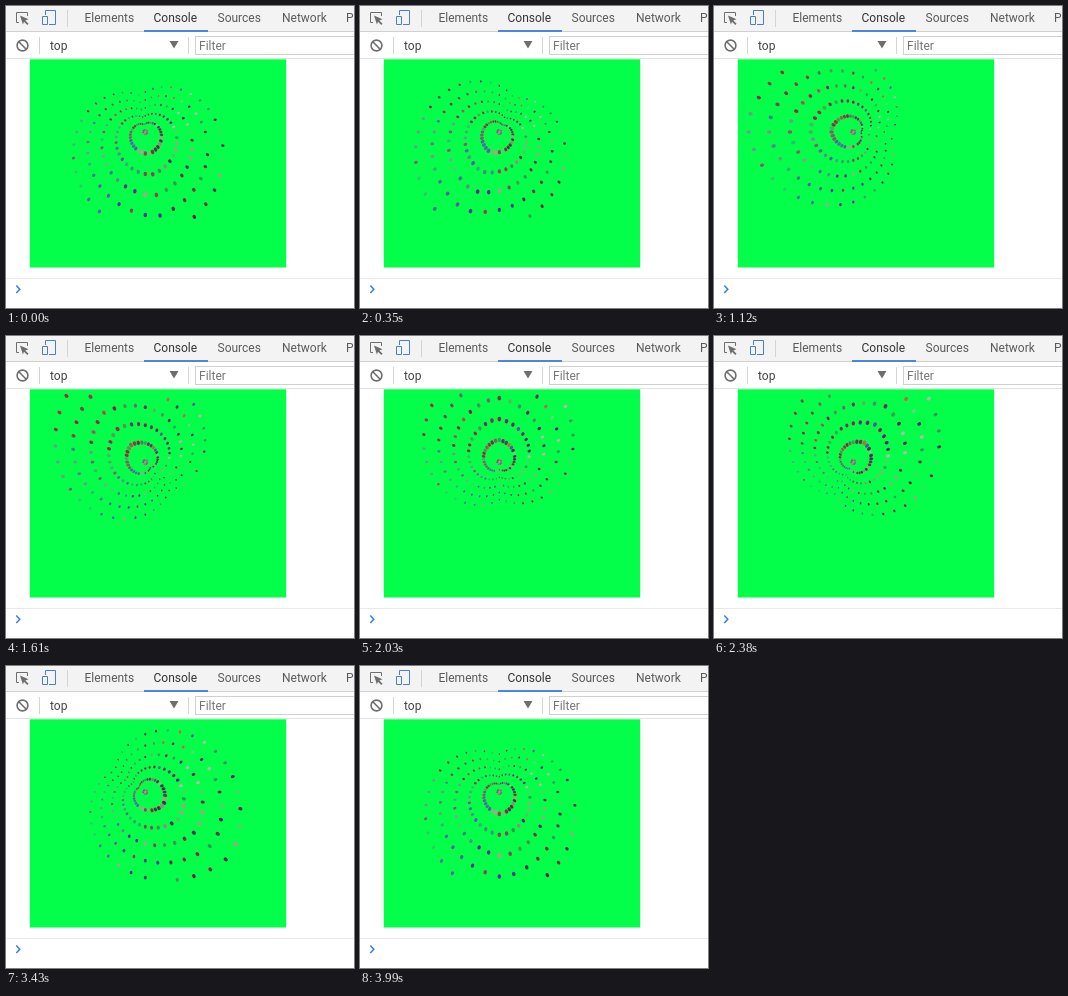
Animation, 348 px wide and 302 px high, one loop 4060 ms. Source, as an HTML page with a canvas:

```html
<!DOCTYPE html>
<html lang="en">
<head>
<meta charset="utf-8">
<title>Console spiral</title>
<style>
html, body { margin: 0; width: 100%; height: 100%; overflow: hidden; background: #fff; }
canvas { display: block; width: 348px; height: 302px; }
</style>
</head>
<body>
<canvas id="stage"></canvas>
<script>
const W = 348, H = 302, LOOP = 4060, STEP = 70;
const SPOKES = 36, RINGS = 5, CX = 139.3, CY = 126;
const canvas = document.getElementById('stage');
const ctx = canvas.getContext('2d');
const ratio = window.devicePixelRatio || 1;
canvas.width = W * ratio;
canvas.height = H * ratio;
ctx.scale(ratio, ratio);

// Dot colours by sector, clockwise from the right.
const sectors = [
  ['#252a3c', '#4a2c34', '#3c3a2c', '#8fae74'],
  ['#4a2028', '#5c3420', '#2c323c', '#88916a'],
  ['#1c3f8c', '#34307a', '#6c4a3c', '#a8a58a'],
  ['#1a7f8a', '#2a6a90', '#2aa273', '#55b880'],
  ['#1f8a80', '#3a8a70', '#3bb470', '#5a6a50'],
  ['#7c3018', '#6c3326', '#8a5a38', '#5e4a2c'],
  ['#662433', '#7a3828', '#54383c', '#3f7a50'],
  ['#4e2b44', '#2b5c8c', '#a8702e', '#3a3846'],
  ['#1c2560', '#302a4a', '#a5c8a0', '#232f3c']
];
const core = ['#a3368c', '#6c4668', '#9c8f90', '#48405c'];

let seed = 71;
function random() {
  seed = (seed * 16807) % 2147483647;
  return seed / 2147483647;
}

const dots = [];
for (let ring = 0; ring <= RINGS; ring++) {
  for (let spoke = 0; spoke < SPOKES; spoke++) {
    const palette = ring ? sectors[Math.floor(spoke / 4)] : core;
    dots.push({
      ring,
      degrees: spoke * 10,
      color: palette[Math.floor(random() * palette.length)],
      alpha: random() < 0.2 ? 0.4 : 0.88
    });
  }
}

function box(x, y, w, h, color) {
  ctx.fillStyle = color;
  ctx.fillRect(x, y, w, h);
}

function path(points, color, width, closed) {
  ctx.beginPath();
  points.forEach(([x, y]) => ctx.lineTo(x, y));
  if (closed) ctx.closePath();
  if (width) {
    ctx.strokeStyle = color;
    ctx.lineWidth = width;
    ctx.stroke();
  } else {
    ctx.fillStyle = color;
    ctx.fill();
  }
}

function label(text, x, y, color) {
  ctx.font = '12px Roboto, "Liberation Sans", sans-serif';
  ctx.fillStyle = color;
  ctx.fillText(text, x, y);
}

function drawIcons() {
  const gray = '#6e6e6e', blue = '#4a80c0';
  path([[13, 16.5], [10.5, 16.5], [10.5, 6.5], [21.5, 6.5], [21.5, 10]], gray, 1);
  path([[14, 9.5], [22.5, 13.3], [19.3, 14.4], [22.6, 17.7], [21.3, 19], [18, 15.7], [16.9, 18.4]], gray, 0, true);
  path([[39.5, 9], [39.5, 4.5], [49.5, 4.5], [49.5, 18.5], [43, 18.5]], blue, 1);
  path([[36.5, 10.5], [41.5, 10.5], [41.5, 18.5], [36.5, 18.5]], blue, 1, true);
  ctx.beginPath();
  ctx.arc(16.5, 39.5, 5.4, 0, Math.PI * 2);
  ctx.strokeStyle = gray;
  ctx.lineWidth = 1.6;
  ctx.stroke();
  path([[12.8, 35.8], [20.2, 43.2]], gray, 1.6);
  path([[163.5, 35], [172.5, 35], [168, 42.5]], gray, 0, true);
}

function drawPanel() {
  box(0, 0, W, H, '#fff');
  box(0, 0, W, 25, '#f3f3f3');
  box(0, 25, W, 1, '#d0d0d0');
  box(0, 52, W, 1, '#e2e2e2');
  box(138, 24, 64, 2, '#4a86e0');
  box(61, 4, 1, 17, '#d4d4d4');
  box(33, 31, 1, 17, '#d4d4d4');
  box(182, 31, 1, 17, '#d4d4d4');
  box(189, 30, W - 189, 19, '#d0d0d0');
  box(190, 31, W - 190, 17, '#fff');
  label('Elements', 78.5, 16, '#5a5a5a');
  label('Console', 147.5, 16, '#333');
  label('Sources', 211.5, 16, '#5a5a5a');
  label('Network', 276, 16, '#5a5a5a');
  label('Performance', 340, 16, '#5a5a5a');
  label('top', 44, 43.5, '#424242');
  label('Filter', 193, 44, '#757575');
  drawIcons();
  box(23.8, 53.3, 256.4, 208.2, '#03ff4a');
  box(0, 272, W, 1, '#e9e9e9');
  path([[10.3, 279.5], [13.8, 283.2], [10.3, 287]], '#3b7be0', 1.5);
}

function drawDot(dot, heading) {
  const turn = Math.abs(((dot.degrees - heading + 540) % 360 + 360) % 360 - 180);
  const near = 1 - turn / 90;
  const radius = (dot.ring + 0.05) * (14.2 + 6.9 * near);
  const angle = dot.degrees * Math.PI / 180;
  const spread = dot.ring ? radius : 2;
  const x = CX + spread * Math.cos(angle);
  const y = CY + spread * Math.sin(angle);
  if (y < 58 || y > 214) return;
  const size = dot.ring ? 1.5 + 0.7 * near : 0.8;
  const ellipse = (scale, color, alpha) => {
    ctx.beginPath();
    ctx.ellipse(x, y, size * 1.12 * scale, size * 0.88 * scale, angle, 0, Math.PI * 2);
    ctx.globalAlpha = alpha;
    ctx.fillStyle = color;
    ctx.fill();
  };
  ellipse(1.3, '#a3aa8a', dot.alpha * 0.45);
  ellipse(0.95, dot.color, dot.alpha);
  ctx.globalAlpha = 1;
}

function frame(now) {
  const time = Math.floor((now % LOOP) / STEP) * STEP;
  const heading = 82 + time * 0.0915;
  drawPanel();
  dots.forEach(dot => drawDot(dot, heading));
}

const start = performance.now();
function tick() {
  frame(performance.now() - start);
  requestAnimationFrame(tick);
}
tick();
</script>
</body>
</html>
```
